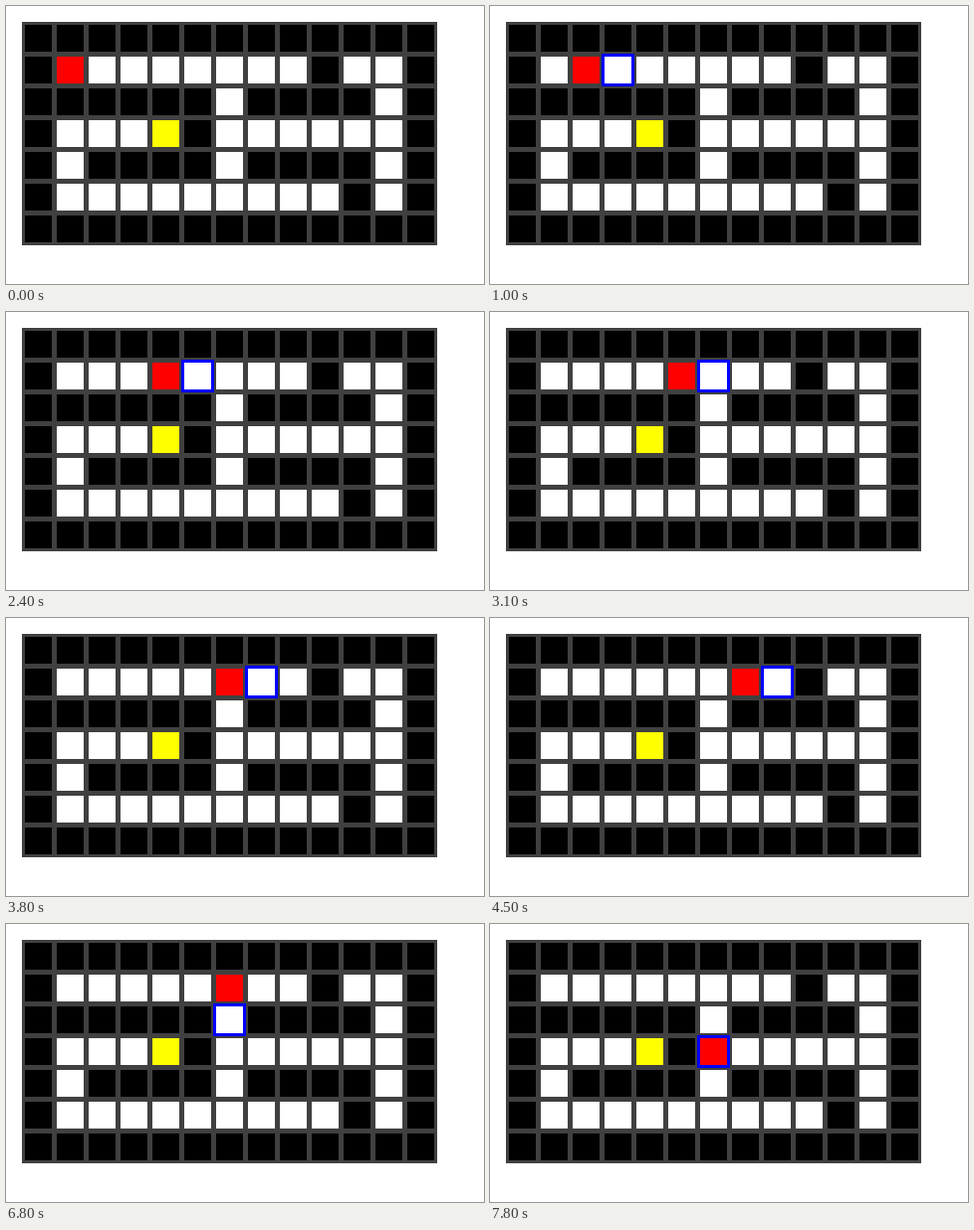
Write an HTML page with a canvas that moves like this. It is 480 by 280 pixels and loops after 8 s.

```html
<!DOCTYPE html>
<html lang="en">
<head>
<meta charset="utf-8">
<title>Left-hand maze walker</title>
<style>
  html, body { margin: 0; width: 100%; height: 100%; overflow: hidden; background: #fff; }
  canvas { display: block; }
</style>
</head>
<body>
<canvas id="stage" width="480" height="280"></canvas>
<script>
const MAZE = [
  '#############',
  '#        #  #',
  '###### #### #',
  '#   G#      #',
  '# #### #### #',
  '#         # #',
  '#############',
];
const DIRS = [[1, 0], [0, 1], [-1, 0], [0, -1]]; // clockwise from right
const LOOP = 8000, START = 100, LOOK = 200, FOUND = 300;
const ORIGIN = 16, PITCH = 32, BORDER = 3;
const ctx = document.getElementById('stage').getContext('2d');

// Left-hand rule: at each cell try left, ahead, right, back.
function buildTimeline() {
  let walker = [1, 1], heading = 0, time = START;
  const steps = [{ time: 0, walker, probe: null }];
  const add = (probe, duration) => {
    steps.push({ time, walker, probe });
    time += duration;
  };
  while (time < LOOP) {
    for (const turn of [3, 0, 1, 2]) {
      const dir = (heading + turn) % 4;
      const next = walker.map((v, i) => v + DIRS[dir][i]);
      const open = MAZE[next[1]][next[0]] !== '#';
      add(next, open ? FOUND : LOOK);
      if (open) {
        walker = next;
        heading = dir;
        break;
      }
    }
    add(walker, LOOK);
  }
  return steps;
}

function fillCell([col, row], color, inset) {
  const size = PITCH + 1 - 2 * inset;
  ctx.fillStyle = color;
  ctx.fillRect(ORIGIN + col * PITCH + inset, ORIGIN + row * PITCH + inset, size, size);
}

function outlineCell([col, row], color) {
  const size = PITCH + 1 - BORDER;
  ctx.strokeStyle = color;
  ctx.lineWidth = BORDER;
  ctx.strokeRect(ORIGIN + col * PITCH + BORDER / 2, ORIGIN + row * PITCH + BORDER / 2, size, size);
}

const timeline = buildTimeline();
const COLORS = { '#': '#000', ' ': '#fff', G: '#ff0' };

function draw(now) {
  const t = now % LOOP;
  const { walker, probe } = timeline.findLast(step => step.time <= t);
  ctx.fillStyle = '#fff';
  ctx.fillRect(0, 0, 480, 280);
  ctx.fillStyle = '#404040';
  ctx.fillRect(ORIGIN, ORIGIN, MAZE[0].length * PITCH + 1, MAZE.length * PITCH + 1);
  MAZE.forEach((line, row) =>
    [...line].forEach((kind, col) => fillCell([col, row], COLORS[kind], BORDER)));
  fillCell(walker, '#f00', BORDER);
  if (probe) outlineCell(probe, '#00f');
  requestAnimationFrame(draw);
}
requestAnimationFrame(draw);
</script>
</body>
</html>
```
